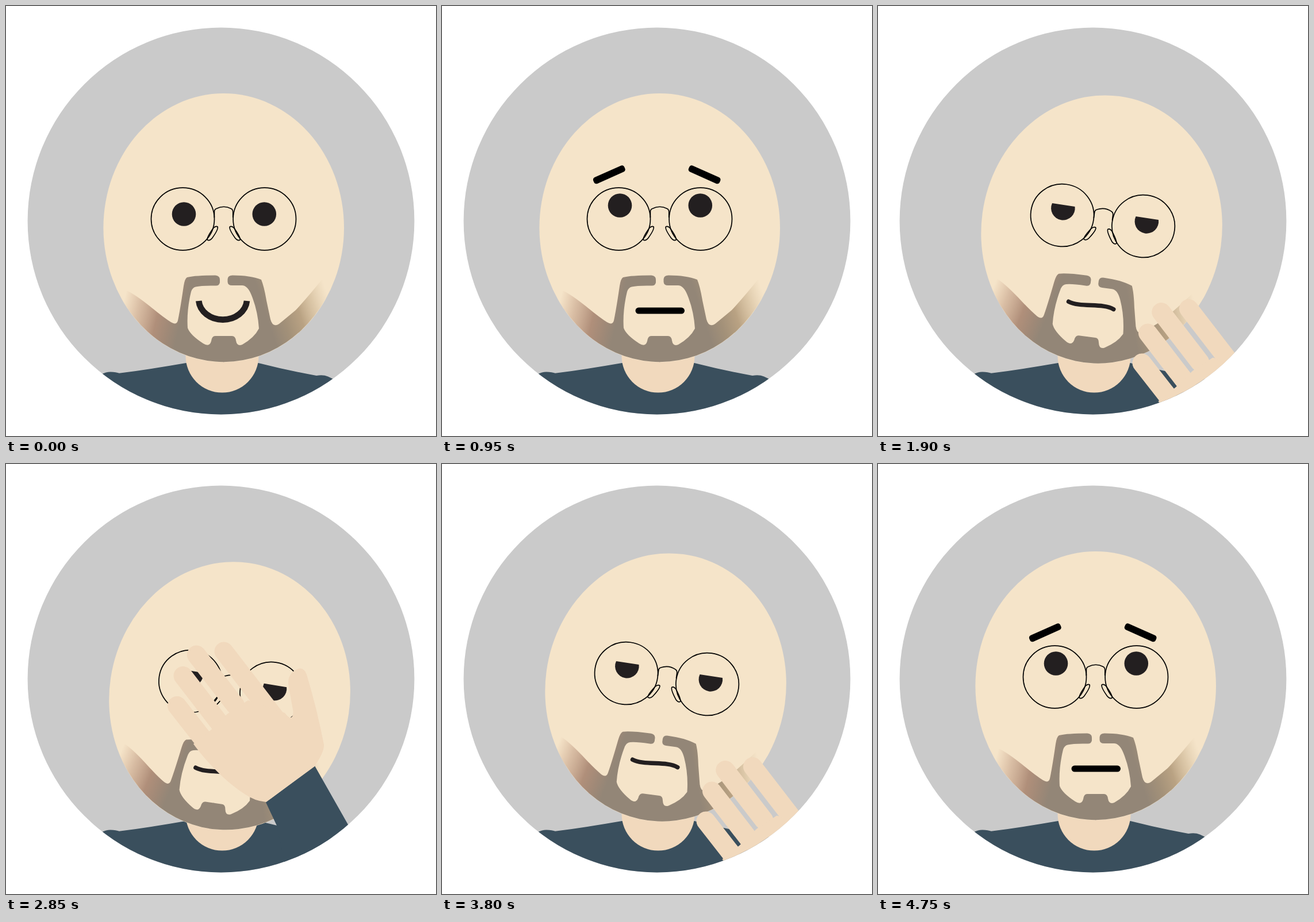
An HTML page for the animation above (5700 ms loop, 748x748 px).

```html
<!DOCTYPE html>
<html lang="en">
<head>
<meta charset="utf-8">
<title>Facepalm</title>
<style>
  html, body { margin: 0; width: 100%; height: 100%; overflow: hidden; background: #fff; }
  svg { display: block; width: 100vw; height: 100vh; }
  .skin { fill: #f1d9bd; }
  .face { fill: #f5e4c9; }
  .cloth { fill: #3a4f5d; }
  .ink { fill: #231f20; }
  .wire { fill: none; stroke: #000; stroke-width: 1.7; }
  .line { fill: none; stroke: #231f20; }
  .fingers { fill: none; stroke: #f1d9bd; stroke-width: 33; stroke-linecap: round; }
</style>
</head>
<body>
<svg viewBox="0 0 748 748">
  <defs>
    <clipPath id="disc"><circle cx="374" cy="374" r="336.4"/></clipPath>
    <clipPath id="beard">
      <path d="M188 482 L212 496 Q226 503 250 522 Q274 542 287 550 Q297 556 299 547
        Q303 528 309 487 Q311 474 315 472 Q330 468.5 364 468.5 Q372 469 372 476
        V481 Q371 487 364 486.5 Q340 486 330 488.5 Q324 490 322 497 Q314 530 316 560
        Q320 572 343 587 Q354 594 357 583 Q358 574 364 574 H393 Q399 574 400 582
        Q402 593 411 589 Q432 577 440 561 Q438 530 427 503 Q420 485.5 410 486
        H393 Q386 486 385.5 480 V475 Q386 468.5 394 468.5 Q425 468.5 444 476
        Q449 488 453 512 L460 545 Q464 560 475 553 Q486 544 504 529
        Q530 501 562 460 L581 445 A209.3 233.7 0 0 1 188 482Z"/>
    </clipPath>
    <linearGradient id="left" gradientUnits="userSpaceOnUse" x1="203" y1="520" x2="305" y2="545">
      <stop offset="0" stop-color="#c9a085" stop-opacity="0"/>
      <stop offset=".28" stop-color="#c09c84" stop-opacity=".55"/>
      <stop offset=".6" stop-color="#b08f7a"/>
      <stop offset=".82" stop-color="#a08977"/>
      <stop offset="1" stop-color="#938677"/>
    </linearGradient>
    <linearGradient id="right" gradientUnits="userSpaceOnUse" x1="455" y1="545" x2="562" y2="510">
      <stop offset="0" stop-color="#938677"/>
      <stop offset=".25" stop-color="#a39179"/>
      <stop offset=".5" stop-color="#b9a283"/>
      <stop offset=".75" stop-color="#cdb694" stop-opacity=".6"/>
      <stop offset="1" stop-color="#d8c3a2" stop-opacity="0"/>
    </linearGradient>
    <path id="pad" d="M360.5 386.5 Q365 382 368 384 Q370 388 358.5 404 Q354 409 350.5 407 Q348 404 360.5 386.5Z"/>
    <path id="lidded" d="M303 343 L342.5 349 A20.8 20.8 0 1 1 303 343Z"/>
  </defs>

  <g clip-path="url(#disc)">
    <rect width="748" height="748" fill="#cacaca"/>
    <path class="cloth" d="M150 652 Q168 636 182 636.6 Q192 637 197 638.8 Q250 632 313 621
      H439 Q490 634 540 643 Q552 641 560 644.5 L580 654 V720 H150Z"/>
    <path class="skin" d="M312.5 590 V609 A63.5 63.5 0 0 0 439.5 609 V590Z"/>

    <g id="lean">
      <g id="head">
        <ellipse class="face" cx="378.7" cy="385.8" rx="209.3" ry="233.7"/>
        <g clip-path="url(#beard)">
          <rect x="180" y="440" width="199" height="190" fill="url(#left)"/>
          <rect x="378" y="440" width="210" height="190" fill="url(#right)"/>
        </g>
        <g class="wire">
          <ellipse cx="307.5" cy="370.5" rx="55" ry="54.3"/>
          <ellipse cx="449.8" cy="370.5" rx="54.7" ry="54.3"/>
          <path d="M362.4 368 V359 Q362 354 366 352.5 Q379 346 391.5 352.5 Q394.8 354 394.8 359 V368"/>
          <use href="#pad"/>
          <use href="#pad" transform="translate(757.4) scale(-1 1)"/>
        </g>
      </g>

      <g id="eyes" class="ink" data-poses="calm worry">
        <circle cx="309.5" cy="362" r="20.8"/>
        <circle cx="449.3" cy="362" r="20.8"/>
      </g>
      <path class="line" data-poses="calm" stroke-width="10.6" d="M335.3 513 A42 35.6 0 0 0 419 513"/>

      <g data-poses="worry">
        <rect x="261.3" y="287.3" width="59" height="12" rx="4.5" transform="rotate(-24 290.8 293.3)"/>
        <rect x="427.1" y="287.3" width="59" height="12" rx="4.5" transform="rotate(24 456.6 293.3)"/>
        <rect x="336.5" y="524.6" width="85.5" height="11" rx="5.5"/>
      </g>

      <g data-poses="tired palm">
        <use class="ink" href="#lidded"/>
        <use class="ink" href="#lidded" x="145.5" y="23.1"/>
        <path class="line" stroke-width="7.4" stroke-linecap="round" d="M331.5 514.2 C352 525 391 516 409.8 527.6"/>
      </g>
    </g>

    <path class="cloth" data-poses="palm" d="M537 525 L452 588.5 L471 629 L490 720 H640 L596 629Z"/>
    <g id="hand" data-poses="tired palm">
      <path class="fingers" d="M379 326 l91 118 M331.3 332 l67 87 M308 368.5 l67 87 M297.5 420.5 l43 55"/>
      <path class="skin" d="M421 411 L386 434 L356 463 L326 487 C350 520 385 555 415 574 Q432 586 452.5 588
        L537 526 Q554 500 553 488 Q542 430 523 366 Q519 355 511 355.5
        C499 358 490 368 491 383 L499.5 430 Q500 441 494 441 Q490 440 485 433Z"/>
    </g>
  </g>
</svg>
<script>
  const STEP = 950;
  const ORDER = ["calm", "worry", "tired", "palm", "tired", "worry"];
  const TILT = "translate(10.4 2.9) rotate(7.67 378.7 385.8)";
  const LEAN = "translate(0 14.8) rotate(.75 389.1 388.7)";

  const byId = id => document.getElementById(id);
  const place = (id, value) => byId(id).setAttribute("transform", value);
  const parts = [...document.querySelectorAll("[data-poses]")]
    .map(el => ({ el, poses: el.dataset.poses.split(" ") }));

  function show(pose) {
    for (const { el, poses } of parts) el.style.display = poses.includes(pose) ? "" : "none";
    const tilted = pose === "tired" || pose === "palm";
    place("head", tilted ? TILT : "");
    place("lean", pose === "palm" ? LEAN : "");
    place("eyes", pose === "worry" ? "translate(0 -15)" : "");
    place("hand", pose === "tired" ? "translate(161.5 200.5)" : "");
  }

  const start = performance.now();
  let current;
  function tick() {
    const pose = ORDER[Math.floor((performance.now() - start) / STEP) % ORDER.length];
    if (pose !== current) show(current = pose);
    requestAnimationFrame(tick);
  }
  tick();
</script>
</body>
</html>
```
